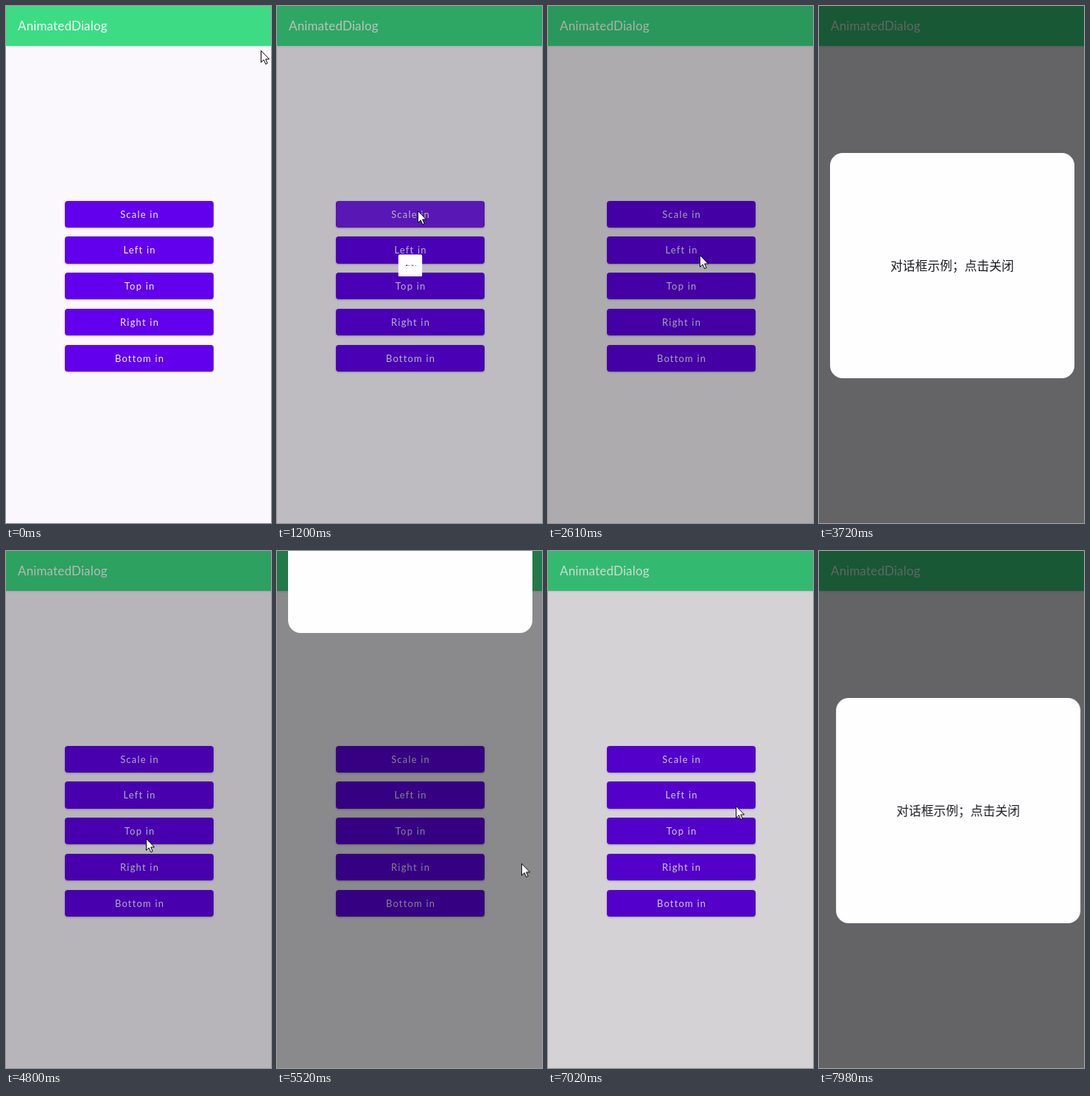
An HTML page for the animation above (8 s loop, 360 by 700 pixels).

```html
<!DOCTYPE html>
<html lang="zh-CN">
<head>
<meta charset="utf-8">
<title>AnimatedDialog</title>
<style>
  :root {
    --loop: 8s;
    --smooth: cubic-bezier(.364, 0, .636, 1);
  }
  html, body { margin: 0; width: 100%; height: 100%; overflow: hidden; }
  body { position: relative; background: #fbf8fd; font-family: Lato, "Open Sans", sans-serif; }
  .bar, .btn, .dim, .dialog, .back, .cursor { position: absolute; }

  .bar {
    left: 0; top: 0; width: 360px; height: 54px;
    padding-left: 16px; box-sizing: border-box;
    background: #3ddc84; color: #f6fff9;
    font-size: 17px; line-height: 54px; letter-spacing: .15px;
    box-shadow: 0 1px 2px rgba(0, 0, 0, .12);
  }

  .btn {
    left: 80px; top: calc(263.6px + var(--i) * 48.75px);
    width: 202px; height: 36.4px;
    border-radius: 4px; background: #6200ee; color: #f4ecff;
    font-size: 13px; line-height: 37px; letter-spacing: 1.2px; text-indent: 1.2px;
    text-align: center; overflow: hidden;
    box-shadow: 0 1px 2.5px rgba(0, 0, 0, .28);
  }
  .btn::after {
    content: ""; position: absolute; left: 0; top: -83px;
    width: 202px; height: 202px; border-radius: 50%;
    background: #fff; opacity: 0;
    animation: ripple var(--loop) linear var(--press) infinite;
  }
  .btn.idle::after { display: none; }

  .dim { inset: 0; background: #000; opacity: 0; animation: dim var(--loop) linear infinite; }

  .dialog {
    left: 15px; top: 198.5px; width: 332px; height: 304.5px;
    border-radius: 17px; background: #fefdff; color: #1c1b1e;
    font: 16.8px/305px "Noto Sans CJK SC", "Noto Sans CJK", sans-serif;
    text-align: center; white-space: nowrap;
    animation: dialog var(--loop) var(--smooth) infinite;
  }

  .back {
    left: 0; top: 338px; width: 46px; height: 88px;
    transform-origin: 0 50%;
    animation: back var(--loop) ease-in-out infinite;
  }
  .cursor {
    left: -1px; top: -1px; width: 15px; height: 22px;
    animation: cursor var(--loop) ease-in-out infinite;
  }

  @keyframes ripple {
    0% { transform: scale(.05); opacity: .18; }
    2% { transform: scale(1); opacity: .18; }
    4%, 100% { transform: scale(1); opacity: 0; }
  }

  @keyframes dim {
    0%, 13.5% { opacity: 0; }
    17.25%, 31.3% { opacity: .6; }
    34.06%, 38.75% { opacity: 0; }
    42.5%, 58.5% { opacity: .6; }
    61.25%, 66% { opacity: 0; }
    70%, 85.6% { opacity: .6; }
    88.5%, 93% { opacity: 0; }
    96.75%, 100% { opacity: .6; }
  }

  @keyframes dialog {
    /* scale */
    0%, 13.5% { transform: translate(0, 0) scale(0); }
    21%, 27.1% { transform: translate(0, 0) scale(1); }
    31.3% { transform: translate(0, 0) scale(0); }
    /* left */
    31.31%, 38.75% { transform: translate(-347px, 0) scale(1); }
    46.25%, 54.2% { transform: translate(0, 0) scale(1); }
    58.5% { transform: translate(-347px, 0) scale(1); }
    /* top */
    58.51%, 66% { transform: translate(0, -504px) scale(1); }
    73.5%, 81% { transform: translate(0, -185px) scale(1); }
    85.6% { transform: translate(0, -504px) scale(1); }
    /* right, cut just before it settles */
    85.61% { transform: translate(345px, 0) scale(1); }
    93% {
      transform: translate(345px, 0) scale(1);
      animation-timing-function: cubic-bezier(.39, 0, .64, .89);
    }
    100% { transform: translate(3.8px, 0) scale(1); }
  }

  @keyframes back {
    0%, 26.99% { transform: scaleX(0); }
    27%, 27.4% { transform: scaleX(1); }
    29%, 50.6% { transform: scaleX(0); }
    52%, 53.8% { transform: scaleX(1); }
    55.4%, 79.12% { transform: scaleX(0); }
    79.125%, 80.6% { transform: scaleX(1); }
    82.4%, 100% { transform: scaleX(0); }
  }

  @keyframes cursor {
    0%, .37% { transform: translate(346px, 60px); }
    7.125%, 9% { transform: translate(192px, 280px); }
    9.375%, 19.5% { transform: translate(191px, 277px); }
    22.5%, 23% { transform: translate(352px, 384px); }
    24.75% { transform: translate(362px, 392px); }
    28.25% { transform: translate(362px, 380px); }
    32.25%, 39.4% { transform: translate(206px, 337px); }
    45%, 54.75% { transform: translate(362px, 420px); }
    59.25%, 66.6% { transform: translate(190px, 389px); }
    70% { transform: translate(362px, 430px); }
    85% { transform: translate(362px, 330px); }
    88.9% { transform: translate(232px, 348px); }
    90%, 94.9% { transform: translate(205px, 429px); }
    98.75%, 100% { transform: translate(362px, 452px); }
  }
</style>
</head>
<body>
  <div class="bar">AnimatedDialog</div>
  <div class="btn" style="--i:0; --press:.99s">Scale in</div>
  <div class="btn" style="--i:1; --press:3s">Left in</div>
  <div class="btn" style="--i:2; --press:5.16s">Top in</div>
  <div class="btn" style="--i:3; --press:7.17s">Right in</div>
  <div class="btn idle" style="--i:4">Bottom in</div>
  <div class="dim"></div>
  <div class="dialog">对话框示例；点击关闭</div>
  <svg class="back" viewBox="0 338 46 88">
    <path d="M0 339C3 350 16 349 28 356C38 362 44 371 44 382C44 393 38 402 28 408C16 415 3 414 0 425" fill="#222224" stroke="#858386" stroke-width=".9"/>
    <path d="M26.5 375L19.5 382L26.5 389.500" fill="none" stroke="#f0f0f0" stroke-width="1.6"/>
  </svg>
  <svg class="cursor" viewBox="-1 -1 15 22">
    <path d="M.5 .5V16.300L4.200 12.900L6.800 18.700L9.200 17.600L6.700 12H11.600Z" fill="#fff" stroke="#000"/>
  </svg>
</body>
</html>
```
